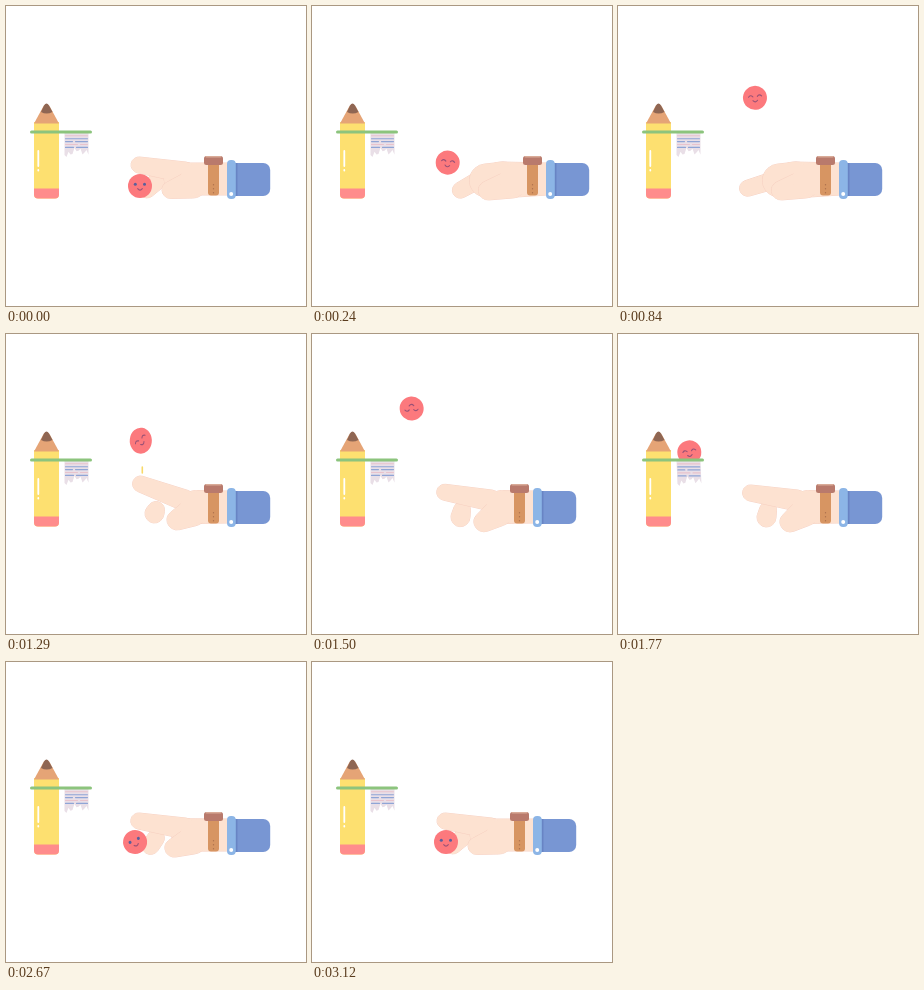
Write an HTML page with a canvas that moves like this. It is 300 px wide and 300 px high and loops after 3150 ms.

```html
<!DOCTYPE html>
<html lang="en">
<head>
<meta charset="utf-8">
<title>Desk basketball</title>
<style>
html, body { margin: 0; width: 100%; height: 100%; overflow: hidden; background: #fff; }
canvas { display: block; width: 300px; height: 300px; }
</style>
</head>
<body>
<canvas width="300" height="300"></canvas>
<script>
const c = document.querySelector('canvas').getContext('2d');
const LOOP = 3150, HIT = 1238, LAND = 1935, TAU = Math.PI * 2;
const SKIN = '#fde2d1', CREASE = '#f5cdbf';

const clamp = v => Math.max(0, Math.min(1, v));
const lin = (t, a, b) => clamp((t - a) / (b - a));
const ease = (t, a, b) => { const u = lin(t, a, b); return u * u * (3 - 2 * u); };
const mix = (a, b, u) => a + (b - a) * u;

// Each circle is x, y, radius; a digit spans its knuckle and its tip
const knuckle = { index: [179, 166.5, 10.5], middle: [150, 176, 8.5], thumb: [187, 178, 14] };
const wrist = [222, 173, 16];
const grip = { index: [133, 159, 8], middle: [141, 184, 8], thumb: [164.5, 184, 8.5], palm: [174, 173, 16] };
const open = { index: [161, 174.5, 16.5], middle: [129.5, 182.3, 8], thumb: [163, 184.5, 9.5], palm: [176, 174, 18] };
const point = { index: [132.5, 159, 8], middle: [148.5, 183.5, 9.5], thumb: [172, 188, 10], palm: [190, 173, 16.5] };

function rect(x, y, w, h, r, fill) {
  c.fillStyle = fill;
  c.beginPath();
  c.roundRect(x, y, w, h, r);
  c.fill();
}

function stroke(d, color, width = 1) {
  c.strokeStyle = color;
  c.lineWidth = width;
  c.stroke(new Path2D(d));
}

function shape(d, fill) {
  c.fillStyle = fill;
  c.fill(new Path2D(d));
}

// Outline around two circles
function limb([x, y, r], [x2, y2, r2]) {
  const a = Math.atan2(y2 - y, x2 - x);
  const b = Math.acos((r - r2) / Math.hypot(x2 - x, y2 - y));
  const path = new Path2D();
  path.arc(x, y, r, a + b, a - b + TAU);
  path.arc(x2, y2, r2, a - b, a + b);
  path.closePath();
  return path;
}

// Limbs merged under one outline
function flesh(...limbs) {
  c.strokeStyle = CREASE;
  c.lineWidth = 0.9;
  c.fillStyle = SKIN;
  limbs.forEach(p => c.stroke(p));
  limbs.forEach(p => c.fill(p));
}

function pencil() {
  rect(28, 116, 25, 76.5, [0, 0, 4, 4], '#fde070');
  rect(28, 182.5, 25, 10, [0, 0, 4, 4], '#ff8c8c');
  shape('M28 117.5L37 101Q40.5 95 44 101L53 117.5Z', '#e5a476');
  shape('M35 106L38 99.5Q40.5 95.5 43 99.5L46.5 106Q40.5 109 35 106Z', '#8f6653');
  stroke('M32.3 145V160M32.3 164V164.5', '#fff', 1.8);
}

function hoop(t) {
  const s = t - 1740, sway = s > 0 ? Math.exp(-s / 330) * Math.sin(s / 75) : 0;
  c.save();
  c.translate(58.5, 127);
  c.transform(1, 0, sway * 0.12, 1 + Math.abs(sway) * 0.1, 0, 0);
  let edge = 'M24 0H0';
  for (let x = 0; x <= 24; x += 2) {
    edge += `L${x} ${22 - x / 8 + 2.8 * Math.sin(x * 1.1) - 4 * Math.sin(x * Math.PI / 24) ** 6}`;
  }
  shape(edge + 'Z', '#e9dfe7');
  for (let i = 0; i < 5; i++) {
    const y = 2.8 + i * 2.9, gap = 7 + (i * 5) % 9;
    const d = i < 2 ? `M1 ${y}H23` : `M1 ${y}H${gap}M${gap + 3} ${y}H23`;
    stroke(d, i % 3 ? '#8fa5d6' : '#e8c3cd', 1.1);
  }
  c.restore();
  rect(24, 124.4, 62, 3.1, 1.5, '#8cc47d');
}

function hand(t) {
  const shift = 13 * ease(t, 60, 210) * (1 - ease(t, 270, 570));
  const raise = ease(t, 1160, HIT) * (1 - ease(t, 1320, 1540));
  const wOpen = ease(t, 50, 200) * (1 - ease(t, 930, 1130));
  const wPoint = ease(t, 930, 1130) * (1 - ease(t, 2430, 2900));
  const pose = (part, dx = 0, dy = 0) => grip[part].map((v, i) =>
    v * (1 - wOpen - wPoint) + open[part][i] * wOpen + point[part][i] * wPoint + [dx, dy, 0][i]);
  const digit = (part, dx, dy) => limb(pose(part, dx, dy), knuckle[part]);

  c.save();
  c.translate(shift, 0);
  flesh(digit('middle', shift * 0.45, shift * 0.15 - raise * 4));
  flesh(limb(pose('palm'), wrist), digit('index', raise * 2, -raise * 9));
  flesh(digit('thumb', -raise, -raise * 2));
  c.fill(limb([190, 173, 15.5], wrist));

  rect(202, 156, 11, 33.5, [0, 0, 3, 3], '#d79562');
  for (let y = 178; y < 188; y += 4) rect(206.8, y, 1.4, 1.4, 0.7, '#ad704d');
  rect(198, 150, 19, 9, 2.5, '#b97a6c');
  rect(199.5, 150, 16, 1.4, 0.7, '#d9ab98');
  rect(227, 157, 37.2, 33, [0, 7, 7, 0], '#7896d3');
  rect(229, 157, 2.5, 33, 0, '#6884c4');
  rect(221, 154, 8.8, 39, 4, '#8cb5e6');
  rect(223.2, 186, 4, 4, 2, '#fff');
  c.restore();
}

function ballState(t) {
  let x, y, turn, stretch = 0;
  if (t < HIT) {
    // Tossed up, then falling onto the finger
    x = 134 + 2 * ease(t, 60, 300) + ease(t, 300, 900);
    y = t < 700 ? Math.min(180, 89 + 68 * ((700 - t) / 460) ** 2.57)
      : 89 + 41 * ((t - 700) / (HIT - 700)) ** 2;
    turn = 0.14 * ease(t, 120, 220) - 0.24 * ease(t, 300, 800) + 0.1 * ease(t, 900, HIT);
    stretch = -0.1 * ease(t, HIT - 30, HIT);
  } else if (t < LAND) {
    // Flicked through the hoop
    const d = t - 1470;
    x = mix(137, 71.3, ease(t, HIT, 1720));
    y = 74 + d * d * (d < 0 ? 1.02e-3 : 4.9e-4);
    turn = -6.49 * lin(t, HIT, 1770) + 0.21 * lin(t, 1770, LAND);
    stretch = 0.08 * (1 - ease(t, 1300, 1430));
  } else {
    // Rolling back to the hand
    const u = 1 - (1 - lin(t, LAND, 3035)) ** 2.3;
    x = mix(71.3, 134, u);
    y = 180 - 7 * Math.sin(Math.PI * lin(t, LAND + 30, 2170));
    turn = TAU * u ** 0.9;
    stretch = -0.1 * (1 - ease(t, LAND, LAND + 80));
  }
  return { x, y, turn, stretch };
}

function ball(t) {
  const { x, y, turn, stretch } = ballState(t);
  c.save();
  c.translate(x, y);
  c.scale(1 - stretch, 1 + stretch);
  c.rotate(turn);
  rect(-12, -12, 24, 24, 12, '#fc797d');
  if (t > 110 && t < 1960) {
    stroke('M-6.3 -1.2Q-4.3 -3.7 -2 -1.2M2.5 -1.2Q4.5 -3.7 6.8 -1.2', '#9a5276', 1.1);
  } else {
    for (const eye of [-4.7, 4.5]) rect(eye - 1.5, -3.3, 3, 3, 1.5, '#59609c');
  }
  stroke('M-2.3 2.7Q0 5.5 2.3 2.7', '#9a5276', 1.1);
  c.restore();
}

function draw(t) {
  c.fillStyle = '#fff';
  c.fillRect(0, 0, 300, 300);
  c.lineCap = c.lineJoin = 'round';
  pencil();
  hand(t);
  ball(t);
  hoop(t);
  if (t > HIT && t < 1345) stroke('M136.3 133V139', '#f8d968', 1.6);
}

const start = performance.now();
function tick() {
  draw((performance.now() - start) % LOOP);
  requestAnimationFrame(tick);
}
tick();
</script>
</body>
</html>
```
